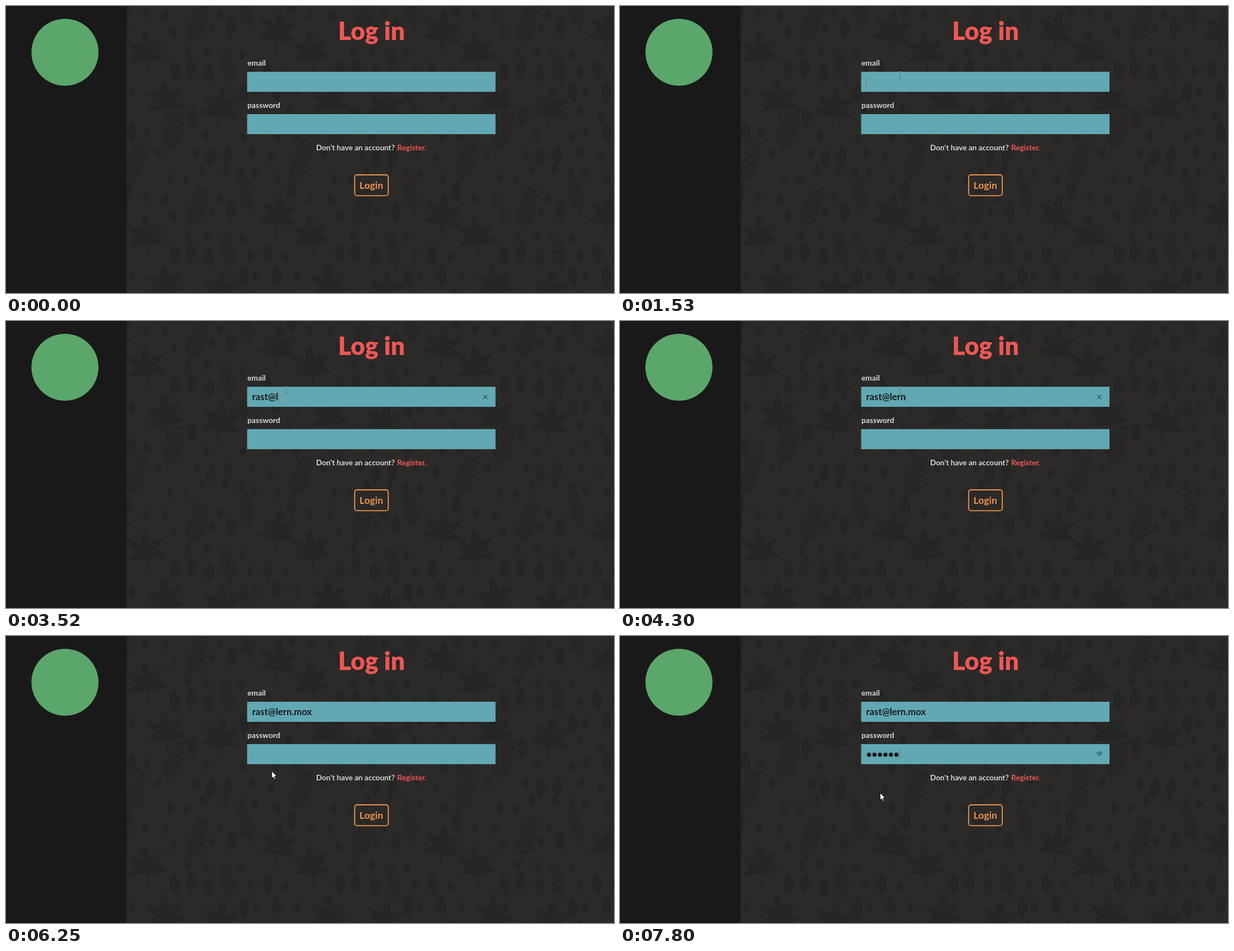
Write an HTML page with a canvas that moves like this. It is 1088x515 px and loops after 8 s.

```html
<!DOCTYPE html>
<html lang="en">
<head>
<meta charset="utf-8">
<title>Log in</title>
<style>
html, body { margin: 0; width: 100%; height: 100%; overflow: hidden; background: #191919; }
canvas { display: block; }
</style>
</head>
<body>
<canvas id="stage" width="1088" height="515"></canvas>
<script>
const W = 1088, H = 515, LOOP = 8000, SIDE = 216;
const ctx = document.getElementById('stage').getContext('2d');
const RED = '#ee5755', ORANGE = '#ee944b', TEAL = '#61a8b3', INK = '#191919', PALE = '#d9d8d6';
const lato = (size, weight = 'bold') => `${weight} ${size}px Lato, "Open Sans", sans-serif`;

const EMAIL = 'rast@lern.mox', EMAIL_FONT = lato(16.7);
const FIELD = { x: 431.5, w: 444.5, h: 36, email: 118, password: 194 };
const focusEmail = 1360, focusPass = 5780;

// Typing bursts: start, characters, ms between characters
const emailBursts = [[2140, 4, 103], [3290, 1, 1], [3520, 4, 130], [4380, 1, 1], [4610, 3, 35]];
const passBursts = [[6870, 2, 75], [7170, 2, 80], [7630, 2, 170]];

// Pointer strokes: start and end time, then a quadratic curve
const strokes = [
  { t0: 380, t1: 860, path: [[913, 503], [530, 300], [418, 254]] },
  { t0: 860, t1: 1200, path: [[418, 254], [455, 244], [501, 124]] },
  { t0: 5230, t1: 5640, path: [[501, 124], [492, 170], [488, 218]] },
  { t0: 6130, t1: 6361, path: [[488, 218], [476, 228], [465, 281]] }
];
const clicks = [[focusEmail, 1530], [5710, 5860]];

const clamp = v => Math.max(0, Math.min(1, v));
const easeOut = u => 1 - (1 - u) ** 2;
const bezier = (a, b, c, u) => (1 - u) ** 2 * a + 2 * u * (1 - u) * b + u * u * c;
// The pointer is sampled about 13 times a second
const sampled = t => Math.floor((t - 355) / 77) * 77 + 355;

function typing(bursts, focus, t) {
  let count = 0, last = focus;
  for (const [at, n, gap] of bursts) {
    if (t < at) break;
    const k = Math.min(n, Math.floor((t - at) / gap) + 1);
    count += k;
    last = at + (k - 1) * gap;
  }
  return { count, age: t - last };
}

function seeded(seed) {
  return () => (seed = (seed * 16807) % 2147483647) / 2147483647;
}

function dot(g, x, y, r) {
  g.beginPath();
  g.arc(x, y, r, 0, 7);
  g.fill();
}

function leaf(g, w, h) {
  g.beginPath();
  g.moveTo(0, -h / 2);
  g.bezierCurveTo(w * .7, -h * .15, w * .6, h * .22, 0, h * .4);
  g.bezierCurveTo(-w * .6, h * .22, -w * .7, -h * .15, 0, -h / 2);
  g.fill();
  g.fillRect(-.7, h * .3, 1.4, h * .22);
}

function maple(g, s) {
  const point = (angle, r) => g.lineTo(Math.sin(angle) * r * s, -Math.cos(angle) * r * s);
  g.beginPath();
  for (let k = -2; k <= 2; k++) {
    const a = k * .92, len = 1 - Math.abs(k) * .1;
    point(a - .46, .42);
    point(a - .2, len * .72);
    point(a, len);
    point(a + .2, len * .72);
    point(a + .46, .42);
  }
  g.fill();
  g.fillRect(-1.5, 0, 3, s * .8);
}

function sprig(g, h) {
  g.fillRect(-1, -h / 2, 2, h);
  for (let i = 0; i < 6; i++) {
    const y = h * (.28 - i * .14), r = h * (.14 - i * .008);
    for (const side of [-1, 1]) {
      g.beginPath();
      g.ellipse(side * r * .75, y - r * .8, r, r * .26, -side * .85, 0, 7);
      g.fill();
    }
  }
}

function makeWallpaper() {
  const tw = 295, th = 330, cols = 9, rows = 9;
  const c = document.createElement('canvas');
  c.width = tw;
  c.height = th;
  const g = c.getContext('2d'), rnd = seeded(77);
  g.fillStyle = '#2c2a28';
  g.fillRect(0, 0, tw, th);
  g.fillStyle = '#252525';

  const place = (draw, x, y, tilt) => {
    for (const dx of [-tw, 0, tw]) for (const dy of [-th, 0, th]) {
      g.save();
      g.translate(x + dx, y + dy);
      g.rotate(tilt);
      draw();
      g.restore();
    }
  };
  const maples = [[69, 174], [167, 186], [36, 86], [270, 50]];
  const sprigs = [[82, 230], [215, 14], [124, 40], [182, 114], [14, 286]];
  maples.forEach(([x, y], i) => place(() => maple(g, 44), x, y, i % 2 ? .12 : -.12));
  sprigs.forEach(([x, y], i) => place(() => sprig(g, i % 2 ? 64 : 84), x, y, i % 2 ? -.2 : .3));

  const gap = (d, span) => Math.min(Math.abs(d), span - Math.abs(d));
  const clear = (x, y, list, rx, ry) =>
    list.every(([bx, by]) => Math.hypot(gap(x - bx, tw) / rx, gap(y - by, th) / ry) > 1);
  for (let row = 0; row < rows; row++) for (let col = 0; col < cols; col++) {
    const x = (col + .5 * (row % 2) + rnd() * .4) * tw / cols;
    const y = (row + rnd() * .5) * th / rows;
    const large = rnd() < .35, tilt = (rnd() - .5) * .2;
    if (clear(x, y, maples, 48, 50) && clear(x, y, sprigs, 26, 48))
      place(() => leaf(g, large ? 18 : 12, large ? 40 : 20), x, y, tilt);
  }
  return c;
}

function text(str, x, y, font, color, align = 'left') {
  ctx.font = font;
  ctx.fillStyle = color;
  ctx.textAlign = align;
  ctx.fillText(str, x, y);
}

const wallpaper = makeWallpaper();

function drawPage() {
  ctx.fillStyle = INK;
  ctx.fillRect(0, 0, W, H);
  ctx.save();
  ctx.translate(SIDE, 0);
  ctx.fillStyle = ctx.createPattern(wallpaper, 'repeat');
  ctx.fillRect(0, 0, W - SIDE, H);
  ctx.restore();

  ctx.fillStyle = '#5ba66b';
  dot(ctx, 105.5, 83, 60);

  text('Log in', 654, 61, lato(44.5, 900), RED, 'center');
  for (const name of ['email', 'password']) {
    text(name, 432, FIELD[name] - 11, lato(13.8), PALE);
    ctx.fillStyle = TEAL;
    ctx.fillRect(FIELD.x, FIELD[name], FIELD.w, FIELD.h);
  }
  text("Don't have an account?", 555, 258.5, lato(13.6), PALE);
  text('Register.', 700, 258.5, lato(13.6), RED);

  ctx.strokeStyle = ORANGE;
  ctx.lineWidth = 1.8;
  ctx.beginPath();
  ctx.roundRect(624, 303, 60, 37.4, 4);
  ctx.stroke();
  text('Login', 653.7, 327.5, lato(17.5), ORANGE, 'center');
}

function drawIcon(build) {
  ctx.strokeStyle = '#243f45';
  ctx.lineWidth = 1.1;
  ctx.beginPath();
  build();
  ctx.stroke();
}

function clearIcon() {
  for (const s of [-1, 1]) {
    ctx.moveTo(854, 136.5 - 3.7 * s);
    ctx.lineTo(861.4, 136.5 + 3.7 * s);
  }
}

function eyeIcon() {
  ctx.arc(857.7, 212.6, 4.6, Math.PI * 1.05, Math.PI * 1.95);
  ctx.moveTo(859.6, 212.6);
  ctx.arc(857.7, 212.6, 1.9, 0, 7);
}

// Holds, fades out, then returns
function drawCaret(x, y, age) {
  ctx.globalAlpha = age < 380 || age >= 930 ? 1 : .4 * clamp((620 - age) / 240);
  ctx.fillStyle = '#96686b';
  ctx.fillRect(Math.round(x), y, 1, 19);
  ctx.globalAlpha = 1;
}

function drawFields(t) {
  const email = typing(emailBursts, focusEmail, t), pass = typing(passBursts, focusPass, t);
  const shown = EMAIL.slice(0, email.count);
  text(shown, 440.5, 142, EMAIL_FONT, INK);
  const emailEnd = 440.4 + ctx.measureText(shown).width;
  for (let i = 0; i < pass.count; i++) dot(ctx, 445.6 + i * 9.8, 213, 3.8);

  if (email.count && t < focusPass) drawIcon(clearIcon);
  if (pass.count) drawIcon(eyeIcon);
  if (t >= focusPass) drawCaret(440.4 + pass.count * 9.9, 202.5, pass.age);
  else if (t >= focusEmail) drawCaret(emailEnd, 127, email.age);
}

function drawBeam() {
  ctx.fillStyle = '#66777a';
  ctx.fillRect(0, -6, 1, 12);
  for (const edge of [-7, 6]) {
    ctx.fillRect(-2.5, edge, 2.5, 1);
    ctx.fillRect(1, edge, 2.5, 1);
  }
}

function drawArrow() {
  ctx.beginPath();
  [[.5, .5], [.5, 13.5], [3.4, 10.8], [5.4, 15.4], [7.5, 14.5], [5.6, 10], [9.6, 9.6]]
    .forEach(p => ctx.lineTo(...p));
  ctx.closePath();
  ctx.lineWidth = 1;
  ctx.strokeStyle = '#111';
  ctx.fillStyle = '#fff';
  ctx.fill();
  ctx.stroke();
}

function drawPointer(t) {
  if (t < strokes[0].t0) return;
  const now = Math.max(sampled(t), strokes[0].t0);
  const { t0, t1, path: [a, b, c] } = strokes.filter(s => now >= s.t0).pop();
  const u = easeOut(clamp((now - t0) / (t1 - t0)));
  const [x, y] = [0, 1].map(i => bezier(a[i], b[i], c[i], u));

  ctx.save();
  ctx.translate(Math.round(x), Math.round(y));
  if (clicks.some(([from, to]) => t >= from && t < to)) {
    ctx.fillStyle = 'rgba(255,255,0,.47)';
    dot(ctx, 0, 0, 10);
  }
  const inside = top => y > top && y < top + FIELD.h;
  const overField = x > FIELD.x && x < FIELD.x + FIELD.w &&
    (inside(FIELD.email) || inside(FIELD.password));
  if (overField) drawBeam();
  else drawArrow();
  ctx.restore();
}

const start = performance.now();
function frame() {
  const t = (performance.now() - start) % LOOP;
  drawPage();
  drawFields(t);
  drawPointer(t);
  requestAnimationFrame(frame);
}
frame();
</script>
</body>
</html>
```
